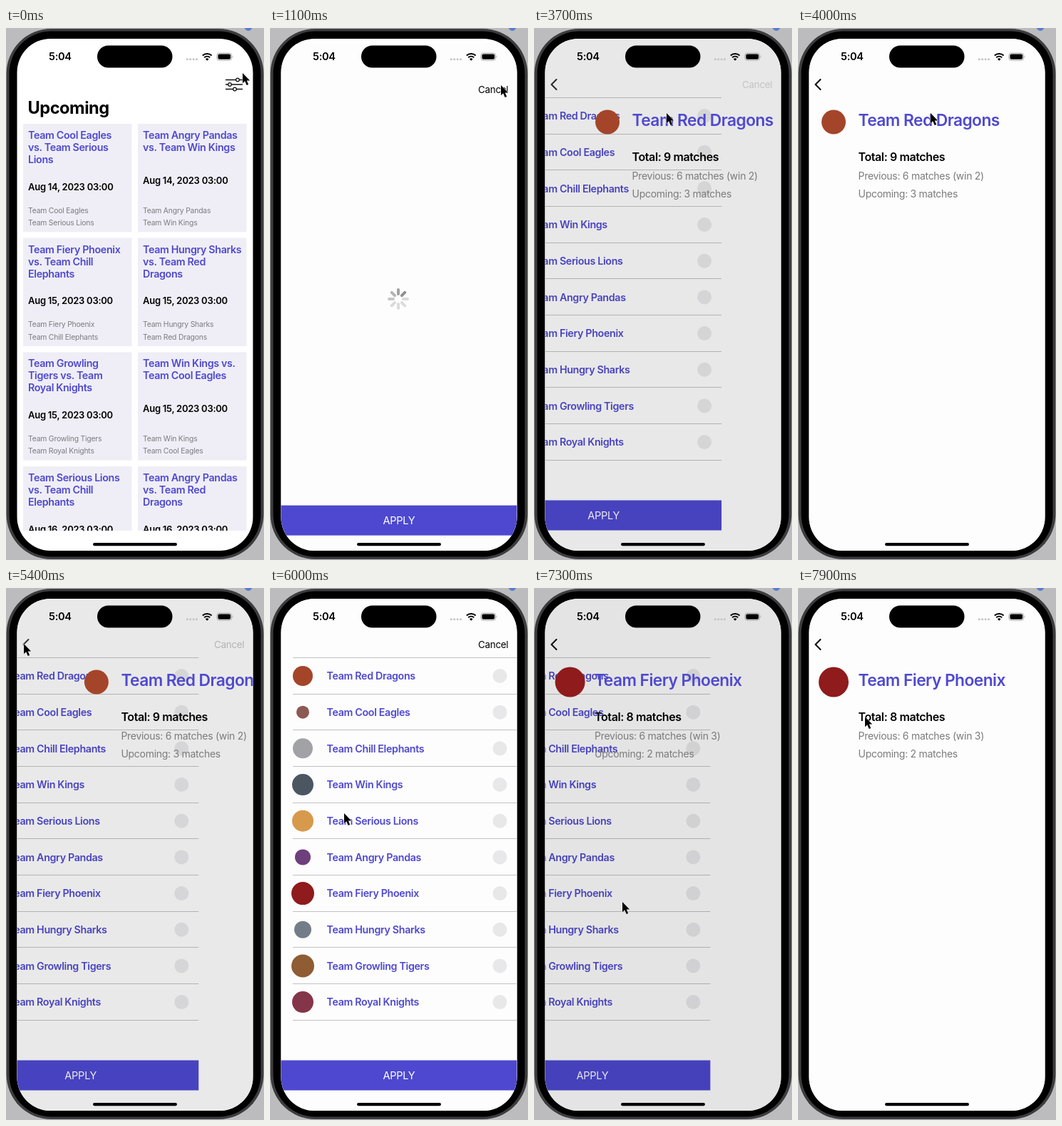
These frames come from a looping animation (362x744 px, 8 s). An HTML page:

```html
<!DOCTYPE html>
<html lang="en">
<head>
<meta charset="utf-8">
<title>Match schedule</title>
<style>
  html, body { margin: 0; width: 100%; height: 100%; overflow: hidden; background: #bcbcbe; }
  svg { display: block; }
  text { font-family: Inter, sans-serif; white-space: pre; }
  .big { font-size: 23.6px; font-weight: 700; letter-spacing: -.02em; }
  .name { font-size: 14.3px; font-weight: 600; letter-spacing: -.025em; fill: #4f49cf; }
  .date { font-size: 13px; font-weight: 600; letter-spacing: -.02em; }
  .sub { font-size: 10.4px; letter-spacing: -.02em; fill: #7b7b80; }
  .team { font-size: 22.8px; font-weight: 600; letter-spacing: -.025em; fill: #4f49cf; }
  .total { font-size: 16px; font-weight: 600; letter-spacing: -.025em; }
  .info { font-size: 14px; letter-spacing: -.02em; fill: #7b7b7d; }
  .plain { font-size: 13.4px; letter-spacing: -.02em; }
  .apply { font-size: 14.6px; letter-spacing: -.02em; fill: #fff; text-anchor: middle; }
  .clock { font-size: 14.6px; font-weight: 600; letter-spacing: -.02em; }
</style>
</head>
<body>
<svg id="stage" width="362" height="744" viewBox="0 0 362 744">
  <defs>
    <clipPath id="screen"><rect x="15.5" y="15" width="331" height="716" rx="47"/></clipPath>
    <clipPath id="cardArea"><rect x="15" y="130" width="332" height="573"/></clipPath>
  </defs>
  <circle cx="340" cy="-1" r="5" fill="#5a7bd0"/>
  <rect x=".5" y="1" width="361" height="742" rx="63" fill="#3d3d3f"/>
  <rect x="4.5" y="4.5" width="353" height="735" rx="59"/>
  <g clip-path="url(#screen)">
    <rect width="362" height="744" fill="#fff"/>
    <g id="home">
      <text class="big" x="30.5" y="120">Upcoming</text>
      <g stroke="#111" stroke-width="1.3" fill="#fff">
        <path d="M308 72.5H332M308 79H332M308 85.5H332"/>
        <circle cx="325" cy="72.5" r="2.3"/><circle cx="314" cy="79" r="2.3"/><circle cx="321" cy="85.5" r="2.3"/>
      </g>
      <g id="cards" clip-path="url(#cardArea)"></g>
    </g>
    <g id="modal">
      <rect y="15" width="362" height="760" fill="#fdfdfd"/>
      <g id="page">
        <g id="list"></g>
        <g id="spinner"></g>
        <rect x="15" y="660.5" width="331.5" height="42" fill="#4d48cf"/>
        <text class="apply" x="181" y="687">APPLY</text>
      </g>
      <text id="cancel" class="plain" x="292" y="84">Cancel</text>
      <rect id="dim" width="362" height="744"/>
      <path id="back" d="M31.5 72L24.5 79L31.5 86" fill="none" stroke="#000" stroke-width="2" stroke-linecap="round" stroke-linejoin="round"/>
      <g id="details"></g>
    </g>
    <text class="clock" x="60" y="45">5:04</text>
    <g fill="#c3c3c5">
      <circle cx="254.3" cy="43.7" r="1.5"/><circle cx="258.7" cy="43.7" r="1.5"/>
      <circle cx="263.1" cy="43.7" r="1.5"/><circle cx="267.5" cy="43.7" r="1.5"/>
    </g>
    <g fill="none" stroke="#000" stroke-width="2">
      <path d="M275.8 38.6A9.4 9.4 0 0 1 288.6 38.6M278.2 41.3A6 6 0 0 1 286.2 41.3"/>
    </g>
    <path d="M282.2 45.8L279.9 43.4A3.4 3.4 0 0 1 284.5 43.4Z"/>
    <rect x="296" y="35.2" width="20.6" height="10" rx="3.2" fill="none" stroke="#a5a5a7"/>
    <rect x="297.4" y="36.6" width="17.8" height="7.2" rx="2"/>
    <path d="M317.7 38.4Q319.4 40.2 317.7 42Z" fill="#a5a5a7"/>
    <rect x="122" y="720" width="118" height="4.2" rx="2.1"/>
  </g>
  <rect x="128" y="24.5" width="105.5" height="31" rx="15.5"/>
  <path id="cursor" d="M0 0V14.2L3.2 11.3L5.7 17L8.2 15.9L5.8 10.4H10.2Z" stroke="#fff" stroke-width="1" paint-order="stroke"/>
</svg>
<script>
const $ = id => document.getElementById(id);

function add(parent, tag, attrs, content) {
  const el = document.createElementNS('http://www.w3.org/2000/svg', tag);
  for (const key in attrs) el.setAttribute(key, attrs[key]);
  if (content) el.textContent = content;
  parent.appendChild(el);
  return el;
}
const label = (parent, cls, x, y, str) => add(parent, 'text', { class: cls, x, y }, str);
const show = (el, on) => el.setAttribute('display', on ? 'inline' : 'none');
const move = (el, x, y) => el.setAttribute('transform', `translate(${x.toFixed(2)} ${y.toFixed(2)})`);

// [title lines, date]
const matches = [
  ['Team Cool Eagles|vs. Team Serious|Lions', 14], ['Team Angry Pandas|vs. Team Win Kings', 14],
  ['Team Fiery Phoenix|vs. Team Chill|Elephants', 15], ['Team Hungry Sharks|vs. Team Red|Dragons', 15],
  ['Team Growling|Tigers vs. Team|Royal Knights', 15], ['Team Win Kings vs.|Team Cool Eagles', 15],
  ['Team Serious Lions|vs. Team Chill|Elephants', 16], ['Team Angry Pandas|vs. Team Red|Dragons', 16]
];
matches.forEach(([title, day], i) => {
  const x = i % 2 ? 185 : 24, y = 134 + 159.7 * (i >> 1);
  const lines = title.split('|'), sides = lines.join(' ').split(' vs. ');
  add($('cards'), 'rect', { x, y, width: 152.5, height: 151.3, fill: '#efeef6' });
  lines.forEach((line, n) => label($('cards'), 'name', x + 7, y + 21 + n * 17, line));
  label($('cards'), 'date', x + 7, y + (lines.length > 2 ? 92.5 : 83.5), `Aug ${day}, 2023 03:00`);
  sides.forEach((side, n) => label($('cards'), 'sub', x + 7, y + 124.7 + n * 17.3, side));
});

// [name, badge colour, badge radius]
const teams = [
  ['Red Dragons', '#a4452a', 14], ['Cool Eagles', '#8b5a52', 9], ['Chill Elephants', '#a0a2a6', 14],
  ['Win Kings', '#4b5661', 15], ['Serious Lions', '#d79a4c', 15], ['Angry Pandas', '#6d3f7c', 11],
  ['Fiery Phoenix', '#8f1b1c', 16], ['Hungry Sharks', '#727d87', 12], ['Growling Tigers', '#8f5c33', 16],
  ['Royal Knights', '#84354a', 15]
];
const badges = add($('list'), 'g', {});
teams.forEach(([name, fill, r], i) => {
  const y = 123 + 50.68 * i;
  add(badges, 'circle', { cx: 46, cy: y, r, fill });
  label($('list'), 'name', 79.5, y + 5.2, 'Team ' + name);
  add($('list'), 'circle', { cx: 322.5, cy: y, r: 10, fill: '#e8e8ea' });
});
for (let i = 0; i <= teams.length; i++) {
  add($('list'), 'rect', { x: 32, y: Math.round(97 + 50.68 * i), width: 314.5, height: 1, fill: '#c2c2c4' });
}

function detail(team, r, total, won, next) {
  const g = add($('details'), 'g', {});
  add(g, 'circle', { cx: 50, cy: 131.5, r, fill: team[1] });
  label(g, 'team', 84.5, 137, 'Team ' + team[0]);
  label(g, 'total', 84.5, 185.6, `Total: ${total} matches`);
  label(g, 'info', 84.5, 212, `Previous: ${total - next} matches (win ${won})`);
  label(g, 'info', 84.5, 237.3, `Upcoming: ${next} matches`);
  return g;
}
const dragons = detail(teams[0], 17, 9, 2, 3);
const phoenix = detail(teams[6], 21, 8, 3, 2);

const spokes = Array.from({ length: 8 }, (_, i) => add($('spinner'), 'rect', {
  x: 178, y: 357, width: 4, height: 10, rx: 2, fill: '#8a8a8a', transform: `rotate(${45 * i} 180 372)`
}));

const LOOP = 8000, STEP = 100, SLIDE = 480;
const T = { modal: 736, list: 1400, badges: 1900, push1: 3520, pop: 5350, push2: 6830 };
const path = [
  [0, 332, 63], [100, 332, 63], [200, 324, 80], [2200, 324, 80], [2600, 246, 157], [3100, 188, 120],
  [3200, 186, 119], [4600, 186, 119], [5200, 25, 78], [5600, 25, 78], [6000, 104, 315], [6500, 124, 439],
  [7500, 124, 439], [7700, 116, 348], [7800, 98, 225], [7900, 94, 180], [8000, 94, 180]
];

// Remaining distance of a critically damped spring.
function rest(ms) {
  const s = Math.max(ms, 0) * .01826;
  return (1 + s) * Math.exp(-s);
}

function covered(t) {
  const slide = start => t - start < SLIDE ? rest(t - start) : 0;
  if (t < T.push1) return 0;
  if (t < T.pop) return 1 - slide(T.push1);
  if (t < T.push2) return slide(T.pop);
  return 1 - slide(T.push2);
}

function cursorAt(t) {
  const i = path.findIndex(p => p[0] > t), [t0, x0, y0] = path[i - 1], [t1, x1, y1] = path[i];
  const k = (t - t0) / (t1 - t0);
  return [x0 + (x1 - x0) * k, y0 + (y1 - y0) * k];
}

function render(t) {
  const c = covered(t), second = t >= T.push2;
  show($('modal'), t > T.modal);
  move($('modal'), 0, 716 * rest(t - T.modal));
  show($('list'), t >= T.list);
  show(badges, t >= T.badges);
  show($('spinner'), t < T.list);
  const head = Math.floor(t / 100) + 6;
  spokes.forEach((s, i) => s.setAttribute('opacity', Math.max(.3, .95 - .16 * ((head - i + 8) % 8))));

  show($('page'), c < 1);
  move($('page'), -99.3 * c, 0);
  $('dim').setAttribute('opacity', c < 1 ? .1 * c : 0);
  $('cancel').setAttribute('opacity', 1 - c);
  $('back').setAttribute('opacity', c);
  show(dragons, c > 0 && !second);
  show(phoenix, c > 0 && second);
  move($('details'), 331 * (1 - c), 0);
  move($('cursor'), ...cursorAt(t));
}

function tick() {
  const t = (performance.now() + 4) % LOOP;
  render(Math.floor(t / STEP) * STEP);
  requestAnimationFrame(tick);
}
tick();
</script>
</body>
</html>
```
